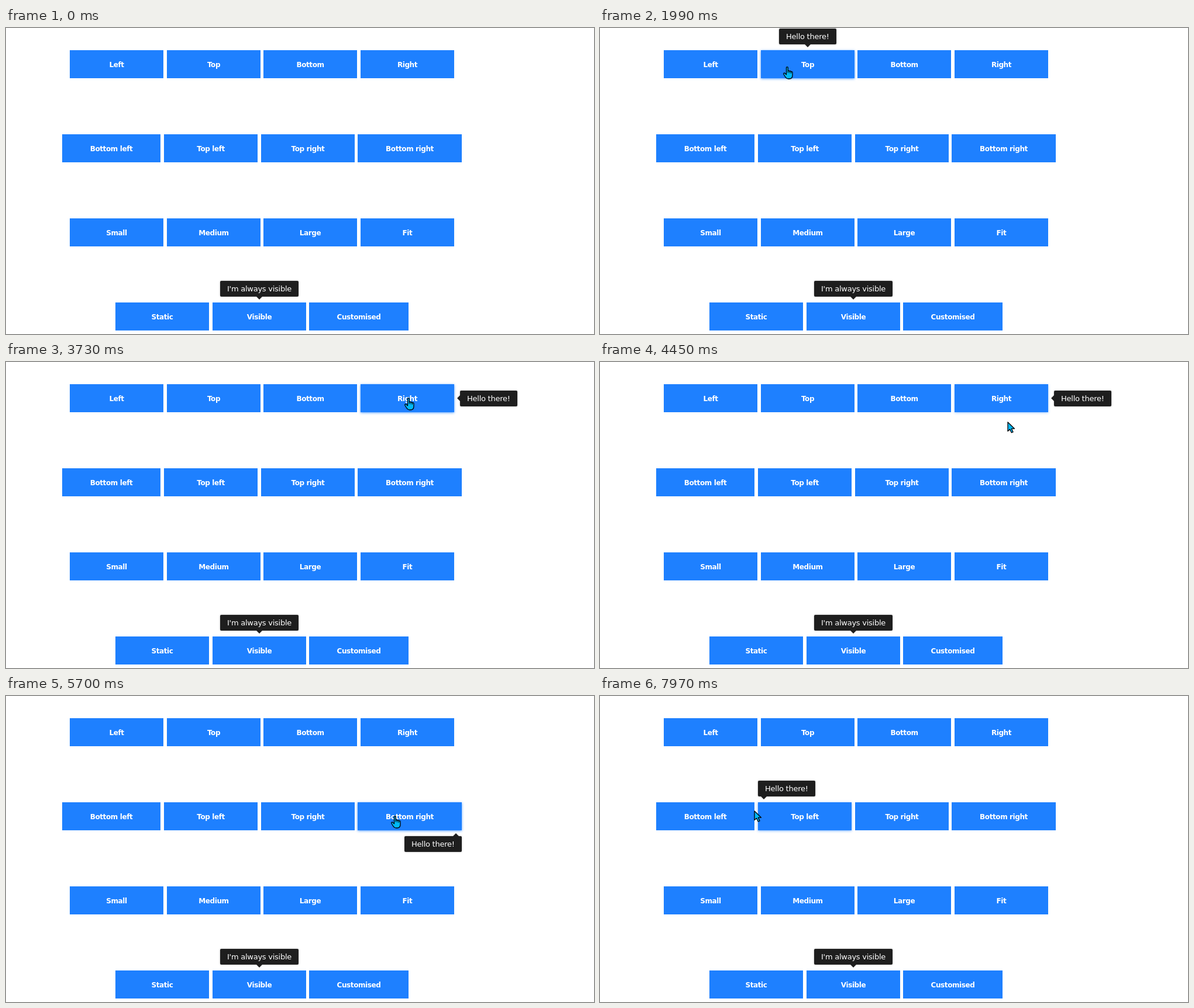
These frames come from a looping animation (1005 by 524 pixels, 8 s). An HTML page:

```html
<!DOCTYPE html>
<html lang="en">
<head>
<meta charset="utf-8">
<title>Tooltips</title>
<style>
  html, body { margin: 0; width: 100%; height: 100%; overflow: hidden; background: #fff; }
  #stage { position: relative; width: 1005px; height: 524px; overflow: hidden; }
  .button, .tip { position: absolute; white-space: nowrap; color: #fff; }
  .button {
    height: 48px; background: #1e80ff; text-align: center; letter-spacing: -.4px;
    font: bold 12px/50px "DejaVu Sans", sans-serif;
  }
  .tip {
    height: 27px; padding: 0 12px; box-sizing: border-box; border-radius: 2px;
    background: #1e1e1e; box-shadow: 0 0 3px rgba(0, 0, 0, .3); letter-spacing: -.25px;
    font: 13px/27px "DejaVu Sans", sans-serif;
  }
  .tip i { position: absolute; width: 7px; height: 7px; background: #1e1e1e; transform: translate(-50%, -50%) rotate(45deg); }
  #cursor { position: absolute; left: 0; top: 0; overflow: visible; }
  #cursor path { fill: #00b8f8; stroke: #000; stroke-width: 1.3; stroke-linejoin: round; stroke-linecap: round; }
  #cursor .crease { fill: none; stroke-width: 1; }
</style>
</head>
<body>
<div id="stage"></div>
<script>
const LOOP = 8000;
const STEP = 78;
const HEIGHT = 48;
const stage = document.getElementById('stage');

const rows = [
  ['Left', 'Top', 'Bottom', 'Right'],
  ['Bottom left', 'Top left', 'Top right', 'Bottom right'],
  ['Small', 'Medium', 'Large', 'Fit'],
  ['Static', 'Visible', 'Customised'],
];
const wide = { 'Bottom left': 168.5, 'Bottom right': 177.7, Customised: 170 };

// Pointer moves: start time, end time, x and y reached
const entry = { to: 0, x: 4, y: 96 };
const moves = [
  [500, 1040, 200, 68], [1190, 1990, 320, 66],
  [2080, 2860, 508, 58], [2950, 3030, 518, 58], [3030, 3730, 688, 61],
  [3840, 3910, 690, 62], [4290, 4450, 697, 103], [4450, 5080, 668, 200],
  [5150, 5230, 665, 205], [5700, 6240, 520, 205],
  [6560, 6860, 457.5, 202.5], [6860, 7350, 340, 199], [7420, 7970, 264, 197],
].map(([from, to, x, y]) => ({ from, to, x, y }));

function addBox(kind, text, x, y, width) {
  const box = document.createElement('div');
  box.className = kind;
  box.textContent = text;
  Object.assign(box.style, { left: x + 'px', top: y + 'px', width: width + 'px' });
  stage.append(box);
  return box;
}

// Each row is centred on the same axis
function addRow(labels, row) {
  const gap = 17 / 3;
  const widths = labels.map(label => wide[label] ?? 160);
  const total = widths.reduce((sum, w) => sum + w + gap, -gap);
  let edge = 437.5 - total / 2;
  return labels.map((label, i) => {
    const x = Math.round(edge);
    const w = Math.round(edge + widths[i]) - x;
    const y = 38 + 144 * row;
    edge += widths[i] + gap;
    return { label, x, y, w, el: addBox('button', label, x, y, w) };
  });
}

// The side is named in words: "top", "bottom right", "left" and so on
function addTip(button, side, text, width) {
  const { x, y, w } = button;
  const [main, align] = side.toLowerCase().split(' ');
  const upright = main === 'top' || main === 'bottom';
  const before = main === 'top' || main === 'left';
  const sign = before ? 1 : -1;
  let tipX, tipY, arrowX, arrowY;
  if (upright) {
    tipX = align === 'left' ? x : align === 'right' ? x + w - width : x + w / 2 - width / 2;
    tipY = before ? y - 37 : y + HEIGHT + 10;
    arrowX = align === 'left' ? 10 : align === 'right' ? width - 10 : width / 2;
    arrowY = before ? 27 : 0;
  } else {
    tipX = before ? x - width - 10 : x + w + 10;
    tipY = y + 11;
    arrowX = before ? width : 0;
    arrowY = 13;
  }
  const el = addBox('tip', text, tipX, tipY, width);
  const arrow = document.createElement('i');
  arrow.style.left = arrowX + 'px';
  arrow.style.top = arrowY + 'px';
  el.append(arrow);
  return { el, shift: upright ? [0, 4 * sign] : [4 * sign, 0] };
}

function pointAt(t) {
  const i = moves.findLastIndex(move => move.from <= t);
  if (i < 0) return entry;
  const a = moves[i - 1] ?? entry;
  const b = moves[i];
  const p = Math.min(1, (t - b.from) / (b.to - b.from));
  return { x: a.x + (b.x - a.x) * p, y: a.y + (b.y - a.y) * p };
}

const inside = (b, p) => p.x >= b.x && p.x < b.x + b.w && p.y >= b.y && p.y < b.y + HEIGHT;

// First and last moment the pointer is over a button
function hoverSpan(button) {
  let on = Infinity, off = Infinity;
  for (let t = 0; t < LOOP; t += 5) {
    if (!inside(button, pointAt(t))) continue;
    on = Math.min(on, t);
    off = t;
  }
  return { on, off };
}

const buttons = rows.flatMap(addRow);
addTip(buttons.find(b => b.label === 'Visible'), 'top', "I'm always visible", 134);
const tips = buttons.filter(b => b.y < 200).map(button => ({
  button, ...hoverSpan(button), ...addTip(button, button.label, 'Hello there!', 98),
}));

stage.insertAdjacentHTML('beforeend', `
  <svg id="cursor" width="1" height="1">
    <path id="arrow" d="M0 0V15.5L3.6 12.3 6.3 18 9 16.8 6.4 11.2H11.5Z"/>
    <g id="hand">
      <path d="M-1.5 1.8C-1.5 .2 1.3 .2 1.3 1.8V8C1.8 6.8 3.7 6.8 4 8.2C4.7 7.3 6.2 7.6 6.5 9
        C7.5 8.3 9 9 9 10.5V15C9 18.5 7 21 3.5 21H2C-1 21-2.3 19.5-3.8 17
        L-6.2 13C-6.8 11.4-5.2 10.4-4 11.5L-1.5 13.8Z"/>
      <path class="crease" d="M1.3 8V10.5M4 8.2V11M6.5 9V11.5"/>
    </g>
  </svg>`);
const [cursor, arrow, hand] = ['cursor', 'arrow', 'hand'].map(id => document.getElementById(id));

const ease = v => {
  const p = Math.min(1, Math.max(0, v));
  return p * p * (3 - 2 * p);
};
const fade = (t, { on, off }, delay, length) =>
  ease((t - on - delay) / length) * (1 - ease((t - off - delay) / length));

// The picture advances in even steps during a move and rests between moves
function stepTime(now) {
  const move = moves.findLast(m => m.from <= now);
  if (!move) return 0;
  const length = move.to - move.from;
  const count = Math.max(1, Math.round(length / STEP));
  const done = Math.floor((now - move.from) / length * count + 1e-6);
  return move.from + length * Math.min(count, done) / count;
}

function draw(now) {
  const t = stepTime(now);
  for (const tip of tips) {
    const shown = fade(t, tip, 70, 200);
    const glow = fade(t, tip, 0, 150);
    tip.el.style.opacity = shown;
    tip.el.style.transform = `translate(${tip.shift.map(s => s * (1 - shown) + 'px')})`;
    tip.button.el.style.boxShadow = `0 1px 4px rgba(30, 128, 255, ${0.75 * glow})`;
  }

  const point = pointAt(t);
  const over = buttons.some(b => inside(b, point));
  cursor.style.display = t < moves[0].from ? 'none' : 'block';
  cursor.style.transform = `translate(${point.x}px, ${point.y}px)`;
  hand.style.display = over ? 'block' : 'none';
  arrow.style.display = over ? 'none' : 'block';
}

const start = performance.now();
function tick() {
  draw((performance.now() - start) % LOOP);
  requestAnimationFrame(tick);
}
tick();
</script>
</body>
</html>
```
